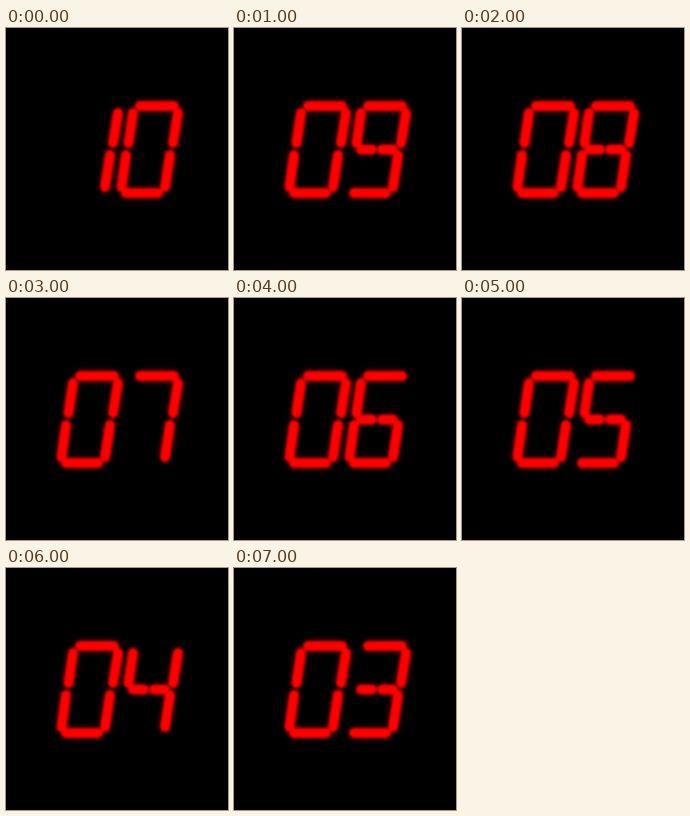
Animation of 222x242 px, one loop 8 s. Source, as an HTML page with a canvas:

```html
<!DOCTYPE html>
<html>
<head>
<meta charset="utf-8">
<style>
  html, body { margin: 0; height: 100%; overflow: hidden; background: #000; }
  canvas { display: block; }
</style>
</head>
<body>
<canvas id="stage" width="222" height="242"></canvas>
<script>
const ctx = document.getElementById('stage').getContext('2d');

// Lines of each segment, relative to the tens digit: [x1, y1, x2, y2]
const SEGMENTS = {
  a: [[74, 78, 108, 78]],
  b: [[112, 85, 107, 115]],
  c: [[104, 127, 99, 159]],
  d: [[60, 165, 92, 165]],
  e: [[60, 127, 55.5, 159]],
  f: [[67, 85, 62.5, 115]],
  g: [[67, 121.5, 78, 121.5], [88, 121.5, 99, 121.5]]
};
const DIGITS = ['abcdef', 'bc', 'abdeg', 'abcdg', 'bcfg',
                'acdfg', 'acdefg', 'abc', 'abcdefg', 'abcdfg'];
const UNITS_X = 60;

ctx.lineCap = 'round';
ctx.lineWidth = 9;
ctx.strokeStyle = '#f00';
ctx.shadowColor = '#b00';

function addDigit(digit, dx) {
  for (const name of DIGITS[digit]) {
    for (const [x1, y1, x2, y2] of SEGMENTS[name]) {
      ctx.moveTo(x1 + dx, y1);
      ctx.lineTo(x2 + dx, y2);
    }
  }
}

function draw(now) {
  const count = 10 - Math.floor(now % 8000 / 1000);
  ctx.clearRect(0, 0, 222, 242);
  ctx.beginPath();
  addDigit(Math.floor(count / 10), 0);
  addDigit(count % 10, UNITS_X);
  ctx.filter = 'blur(1.3px)';
  ctx.shadowBlur = 5;
  ctx.stroke();
}

const start = performance.now();
function tick() {
  draw(performance.now() - start);
  requestAnimationFrame(tick);
}
tick();
</script>
</body>
</html>
```
